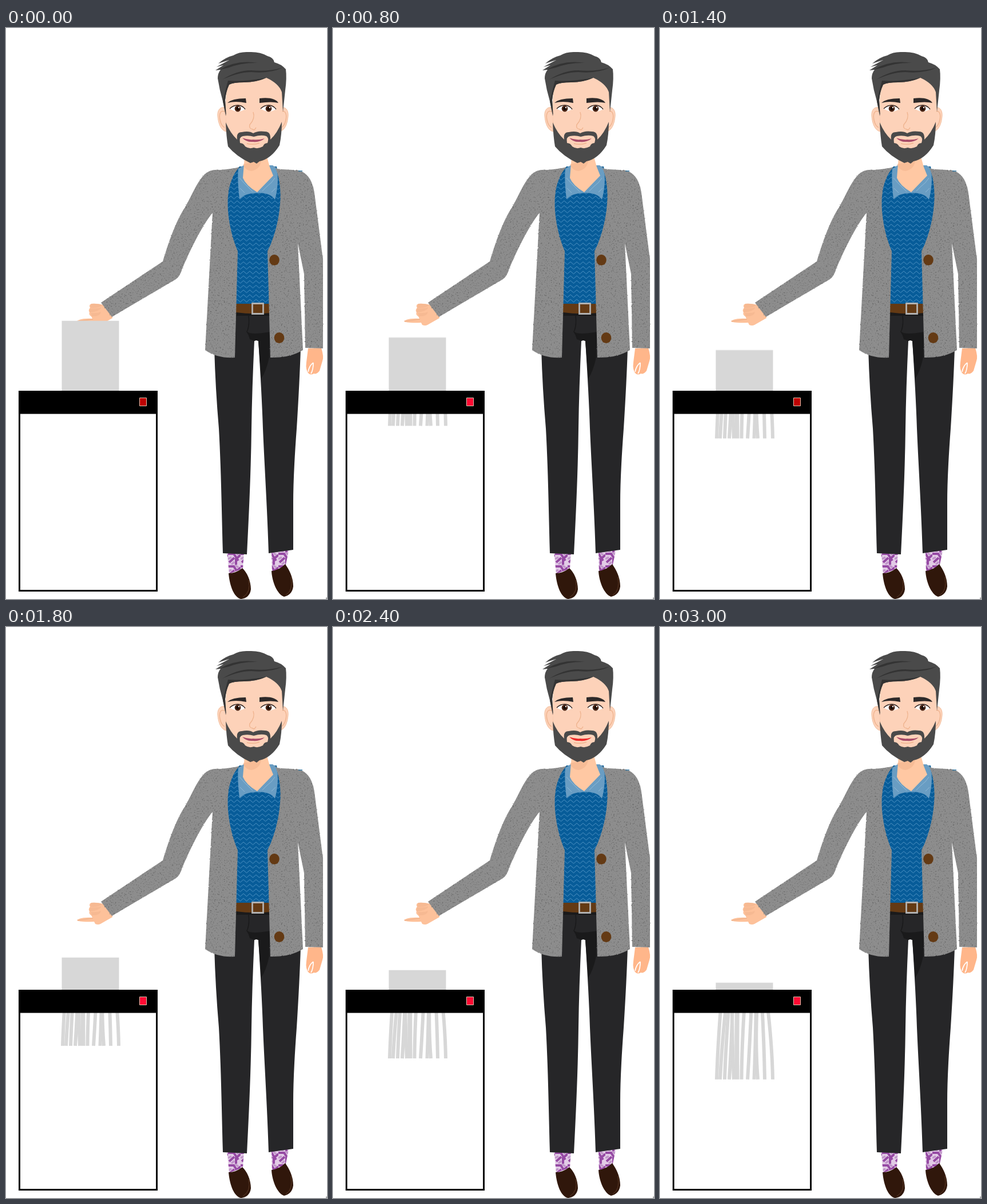
Write an HTML page without scripts that moves like this. It is 561 px wide and 998 px high and loops after 3.2 s.

```html
<!DOCTYPE html>
<html lang="en">
<head>
<meta charset="utf-8">
<title>Paper shredder</title>
<style>
  html, body { margin: 0; width: 100%; height: 100%; overflow: hidden; background: #fff; }
  svg { display: block; width: 100%; height: 100%; }
  .sheet { animation: feed 3.2s steps(16) infinite; }
  .strips { fill: none; stroke: #d7d7d7; stroke-width: 6; animation: shred 3.2s infinite; }
  .led { stroke: #e6c3ae; animation: blink 3.2s step-end infinite; }
  .lips { animation: lips 3.2s step-end infinite; }
  @keyframes feed { to { transform: translateY(117.2px); } }
  @keyframes shred {
    0% { transform: none; animation-timing-function: steps(12); }
    75% { transform: translateY(88px); animation-timing-function: steps(4); }
    100% { transform: translateY(137px); }
  }
  @keyframes blink {
    0%, 43.75%, 87.5% { fill: #bd0303; }
    6.25%, 50%, 93.75% { fill: #ff0a33; }
  }
  @keyframes lips {
    0%, 37.5%, 81.25% { fill: #a94c69; }
    31.25%, 75% { fill: #ee2a2a; }
  }
  .skin { fill: #fdd2b9; }
  .warm { fill: #ffc8a3; }
  .shade { fill: #f2b48d; }
  .line { fill: none; stroke: #efb48f; stroke-width: 1.4; }
  .hair { fill: #4a4a4a; }
  .dark { fill: #333; }
  .wool { fill: #8d8d8d; }
  .pants { fill: #262628; }
  .fold { fill: #1a1a1b; }
  .leather { fill: #643a14; }
  .shoe { fill: #30170b; }
</style>
</head>
<body>
<svg viewBox="0 0 561 998" preserveAspectRatio="none">
  <defs>
    <pattern id="zigzag" width="11" height="8.2" patternUnits="userSpaceOnUse" patternTransform="translate(404 243)">
      <path d="M0 0h11v8.2H0z" fill="#075c99"/>
      <path d="M-1 .8 0 1.6 5.500 6.400 11 1.600 12 .8" fill="none" stroke="#5b9ccb" stroke-width=".9"/>
    </pattern>
    <pattern id="sock" width="22" height="22" patternUnits="userSpaceOnUse" patternTransform="translate(388 916)">
      <path d="M0 0h22v22H0z" fill="#e2cbe6"/>
      <path d="M0 3h10l8 12M2 18l9-8M14 22V12l8-7" fill="none" stroke="#964aa4" stroke-width="4"/>
      <path d="M12 0l6 5M0 12l6-3M6 22l5-5" fill="none" stroke="#c196ca" stroke-width="3.500"/>
    </pattern>
    <filter id="tweed" x="-2%" y="-2%" width="104%" height="104%" color-interpolation-filters="sRGB">
      <feTurbulence type="fractalNoise" baseFrequency=".42" numOctaves="2" seed="7" result="noise"/>
      <feColorMatrix in="noise" values="0 0 0 0 .42  0 0 0 0 .42  0 0 0 0 .42  5 0 0 0 -2.9" result="specks"/>
      <feDisplacementMap in="SourceGraphic" in2="noise" scale="2" xChannelSelector="R" yChannelSelector="G" result="cloth"/>
      <feComposite in="specks" in2="cloth" operator="in" result="weave"/>
      <feMerge><feMergeNode in="cloth"/><feMergeNode in="weave"/></feMerge>
    </filter>
    <clipPath id="bin"><path d="M25 674h237v308H25z"/></clipPath>
    <clipPath id="slot"><path d="M25 400h237v235H25z"/></clipPath>
    <g id="eye">
      <path d="M-14 0Q-9-6 0-6T13 1Q6 5 0 5T-14 0Z" fill="#fff"/>
      <circle r="5.400" fill="#4c2616"/>
      <circle r="2.700" fill="#160a06"/>
      <circle cx="2" cy="-2" r="1.200" fill="#fff"/>
      <path d="M-14 0Q-8-6 0-6T13 1" fill="none" stroke="#2b1c18" stroke-width="1.300"/>
    </g>
    <g id="ear">
      <path class="skin" d="M8-20C-1-24-8-18-7-6S-2 19 8 21Z" stroke="#f2bd9b"/>
      <path class="line" d="M5-14C-3-17-5-8-3 1S2 12 5 14"/>
    </g>
  </defs>

  <!-- legs -->
  <path d="M386 914h30l-2 31-24 9Z" fill="url(#sock)"/>
  <path d="M464 914l31-4-7 32-23 10Z" fill="url(#sock)"/>
  <path class="shoe" d="M389 953Q402 953 413 944C421 951 428 966 428 981Q426 996 411 998C399 996 391 976 389 953Z"/>
  <path class="shoe" d="M464 949Q478 947 488 937C495 947 502 960 502 976Q500 991 486 994C474 990 465 968 464 949Z"/>
  <path d="M424 965Q429 985 414 995M498 959Q502 984 489 991" fill="none" stroke="#5c3a26"/>
  <path class="pants" d="M403 495H460L515 560Q513 620 508 700Q502 780 502 830V912L459 918C457 850 452 770 449 700Q447 640 441 547Q437 545 434 547Q430 630 429 700C428 780 424 860 421 920L379 918C377 850 376 770 372 700Q366 630 364 560Z"/>
  <path class="fold" d="M403 497H460V503H403ZM422 531Q428 537 462 531L460 575Q455 600 446 613L441 547Q437 545 434 547L426 544Z"/>
  <path d="M424 503Q426 520 421 531L429 543" fill="none" stroke="#1a1a1b" stroke-width="1.500"/>

  <!-- shirt and belt -->
  <path d="M408 242H473L484 300V390L461 483H402L384 380V270Z" fill="url(#zigzag)"/>
  <path class="leather" d="M402 482H462V498Q430 501 402 497Z"/>
  <path d="M430.500 481.500h19v18h-19z" fill="#643a14" stroke="#b1b1b1" stroke-width="2.800"/>
  <path d="M406 246L415 240 466 240 473 245Q478 270 470 300Q461 287 439 288.500Q418 288 408 299Q404 265 406 246Z" fill="#699dc3"/>
  <path d="M408 262l8 9 7 7 8 8M409 280l8 8M470 262l-6 8-8 7-8 8M471 280l-7 7" fill="none" stroke="#8fb9d6"/>
  <path class="warm" d="M417 225H456L461 243 467 258 439 287Q419 275 414 262Z"/>
  <path class="shade" d="M414 238L446 232Q444 247 429 250Q418 249 414 238Z" opacity=".6"/>

  <!-- hands -->
  <path d="M528 560L551 559Q556 575 553 582L548 599Q543 606 538 604Q533 607 529 604Q523 598 525 584Z" fill="#ffb68a"/>
  <path d="M537 585Q530 590 528 601M537 585Q537 598 533 604" fill="none" stroke="#fff" stroke-width="1.700"/>
  <path d="M171 484Q157 481 149 482Q144 484 147 489Q143 493 146 497Q144 501 149 504L151 508Q132 507 124 512Q126 516 154 515L156 519Q161 521 165 519L186 507 186 500Z" fill="#fdc19a"/>
  <path class="shade" d="M149 482Q164 481 167 485Q163 490 147 489ZM147 490Q160 491 166 488Q166 495 146 497ZM148 498Q160 499 166 496Q164 505 150 504Z" opacity=".6"/>
  <path class="line" d="M125 513Q143 510 152 509"/>

  <!-- cardigan -->
  <g class="wool" filter="url(#tweed)">
    <path d="M408 243Q398 246 374 248Q355 246 345 258C333 271 325 292 313 313C297 338 287 366 274 408L166 480 185 505 297 439Q304 434 308 421C319 394 342 346 361 323L348 563Q370 578 400 576L405 390C388 350 375 278 408 243Z"/>
    <path d="M469 241L473 246Q493 248 508 248C527 252 537 266 540 296L554 405V560L523 559 521 430 510 376 519 563Q495 577 462 576L457 390C478 350 489 278 469 241Z"/>
  </g>
  <path d="M511 250h7" stroke="#31749f" stroke-width="1.500"/>
  <ellipse class="leather" cx="469" cy="405.500" rx="8.800" ry="9.500"/>
  <ellipse class="leather" cx="477.500" cy="541.500" rx="8.800" ry="9.500"/>

  <!-- head -->
  <use href="#ear" x="377" y="160"/>
  <use href="#ear" transform="translate(486 160) scale(-1 1)"/>
  <path class="skin" d="M386 96Q430 72 472 88L485 108 481 178Q468 218 434 232Q401 222 386 178L383 140Z"/>
  <path class="hair" d="M384 165Q392 184 404 195Q402 182 412 182Q425 179 432 184Q440 179 453 181Q463 181 462 195Q474 184 482 164Q482 186 478 205Q463 229 443 233L438 237 433 234 427 236Q402 224 388 207Q385 190 384 165Z"/>
  <path class="skin" d="M409 201Q407 190 414 189Q424 187 433 190Q446 186 455 189Q460 192 457 201Q451 201 449 207Q440 212 433 209Q425 212 418 207Q415 201 409 201Z"/>
  <path class="lips" d="M413 192Q423 196 432 195Q443 196 452 193Q444 200 432 199Q420 200 413 192Z"/>
  <path class="line" d="M421 202Q433 205 443 201"/>
  <path class="line" d="M432 147Q436 158 426 169Q424 176 431 177Q434 180 437 174"/>
  <use href="#eye" x="405" y="141"/>
  <use href="#eye" x="459" y="141"/>
  <path d="M387 131Q395 123 419 123L420 131Q401 127 387 131ZM443 123Q469 120 476 131Q465 128 443 131Z" fill="#2d2929"/>
  <path class="hair" d="M384 154L379 128Q373 108 370 88Q370 79 375 73L366 74 380 65 368 68 390 56 371 62Q384 51 397 48Q408 41 424 42Q444 41 457 49Q468 52 469 60Q481 63 489 72Q491 88 488 109L484 147 482 112Q477 97 455 87Q441 94 416 95Q397 95 390 99Q384 112 383 126Z"/>
  <path class="dark" d="M455 87Q437 95 416 95Q397 95 390 99Q384 112 383 126L385 154 379 128 384 107 388 92Q417 94 455 87ZM373 73Q403 55 440 61Q413 60 390 69ZM378 90Q404 74 428 74Q458 77 484 69Q462 80 429 77Q407 77 378 90Z"/>

  <!-- shredder -->
  <g clip-path="url(#slot)"><path class="sheet" d="M97.500 511.700h100v140h-100z" fill="#d7d7d7"/></g>
  <g clip-path="url(#bin)">
    <g class="strips">
      <path d="M99 666Q101 605 107 530"/>
      <path d="M105 666Q108 605 116 530"/>
      <path d="M113 666Q115 605 121 530"/>
      <path d="M121 666Q125 605 127 530"/>
      <path d="M129 666Q126 605 126 530"/>
      <path d="M134.500 666Q134 605 135 530" stroke-width="8"/>
      <path d="M142.500 666Q143 605 148 530"/>
      <path d="M153 666Q157 605 160 530"/>
      <path d="M164.500 666Q167 605 168 530"/>
      <path d="M171 666Q166 605 170 530"/>
      <path d="M183 666Q182 605 178 530"/>
      <path d="M197 666Q196 605 187 530"/>
    </g>
  </g>
  <path d="M23.500 635.500h240v348h-240z" fill="none" stroke="#000" stroke-width="3"/>
  <path d="M22 634h243v40.500H22z"/>
  <path class="led" d="M233.500 646.500h12v14h-12z"/>
  <path d="M559 996.500h2" stroke="#444"/>
</svg>
</body>
</html>
```
